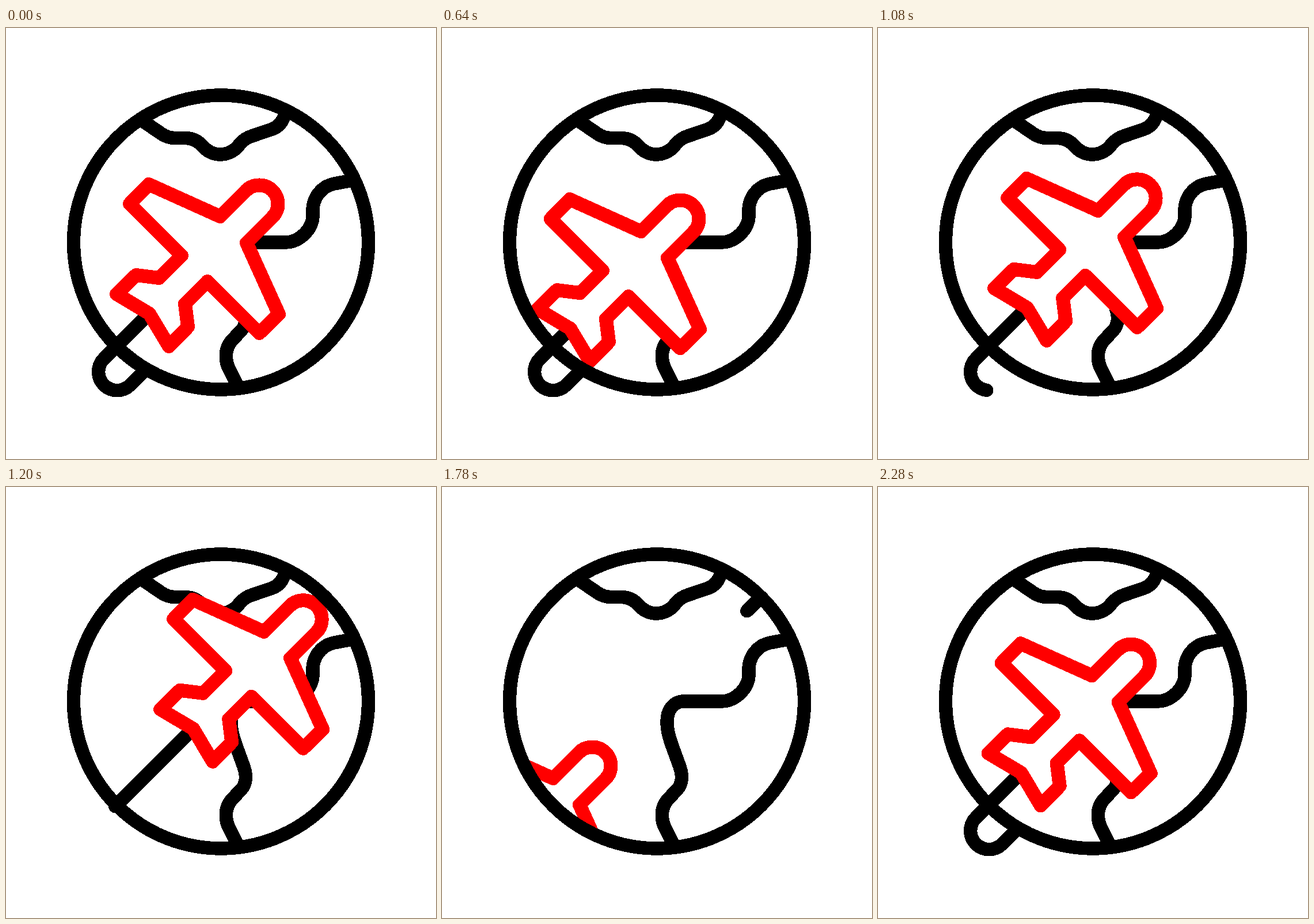
Animation of 747 by 750 pixels, one loop 2.4 s. Source, as an HTML page:

```html
<!DOCTYPE html>
<html lang="en">
<head>
<meta charset="utf-8">
<title>Plane around the globe</title>
<style>
  html, body { margin: 0; width: 100%; height: 100%; overflow: hidden; background: #fff; }
  svg { display: block; width: 100%; height: 100%; shape-rendering: crispEdges; }
  .line { fill: none; stroke: #000; stroke-width: 23.5; stroke-linejoin: round; }
  .trail { stroke-linecap: round; }
  #plane { fill: #fff; stroke: #f00; stroke-width: 24; stroke-linejoin: round; }
</style>
</head>
<body>
<svg viewBox="0 0 747 750">
  <defs>
    <clipPath id="disc"><circle cx="373.5" cy="373" r="262"/></clipPath>
    <path id="route" d="M240 597 L216 621 A32 32 0 0 1 170 575.5 L552 193.5"/>
  </defs>
  <g class="line">
    <path d="M235 160 L270 184 Q281 191.5 294 191.5 L312 191.5 Q328 192 338 202 L344 208
      Q356 220 372 220 Q388 220 400 209 L409 199 Q417 191 427 188 L461 176.5 Q478 171 484.5 151"/>
    <path d="M602 265 L570 271 C550 275 533 293 533 318 L533 326 C533 350 510 373 485 373 L418 373
      C400 375 391 390 391 408 C391 427 397 443 403 459 L411 481 Q416.5 495 416.5 506
      Q416 519 408 527 L393 543 Q381 556 382.5 575 Q383 584 387 592 L401 620"/>
    <use id="oldTrail" class="trail" href="#route"/>
    <use id="newTrail" class="trail" href="#route"/>
  </g>
  <g clip-path="url(#disc)">
    <path id="plane" d="M372 328 L417 283 A32.3 32.3 0 0 1 463 329 L418 374 L474 498 L440 531
      L350 441 L311 480 L316 520 L283 554 L249 497 L192 463 L226 430 L266 435 L305 396 L215 306 L248 272 Z"/>
  </g>
  <circle class="line" cx="373.5" cy="373" r="256"/>
</svg>
<script>
  const LOOP = 2400;
  const BACK = 908, GONE = 1708, HOME = 2295;
  const TAIL = 245;          // route length up to the resting plane
  const LIFT = 1004, SPEED = 0.829;

  const $ = id => document.getElementById(id);
  const plane = $("plane"), oldTrail = $("oldTrail"), newTrail = $("newTrail");
  const routeLength = $("route").getTotalLength();

  // eased move from a to b between times t0 and t1
  function ease(t, t0, t1, a, b) {
    const u = Math.min(1, Math.max(0, (t - t0) / (t1 - t0)));
    return a + (b - a) * u * u * (3 - 2 * u);
  }

  function shift(t) {
    if (t < BACK) return ease(t, 0, BACK, 0, -33);
    if (t < GONE) return ease(t, BACK, GONE, -33, 326);
    return ease(t, GONE, HOME, -187, 0);
  }

  function drawTrail(el, from, to) {
    const size = Math.min(to, routeLength) - from;
    el.style.display = size > 0 ? "" : "none";
    el.style.strokeDasharray = `${Math.max(size, 0)} 2000`;
    el.style.strokeDashoffset = -from;
  }

  function render(t) {
    const d = shift(t), head = TAIL + d * Math.SQRT2;
    plane.setAttribute("transform", `translate(${d} ${-d})`);
    drawTrail(oldTrail, Math.max(0, (t - LIFT) * SPEED), t < GONE ? head : routeLength);
    drawTrail(newTrail, 0, t < GONE ? 0 : head);
  }

  const start = performance.now();
  function tick() {
    render((performance.now() - start) % LOOP);
    requestAnimationFrame(tick);
  }
  tick();
</script>
</body>
</html>
```
